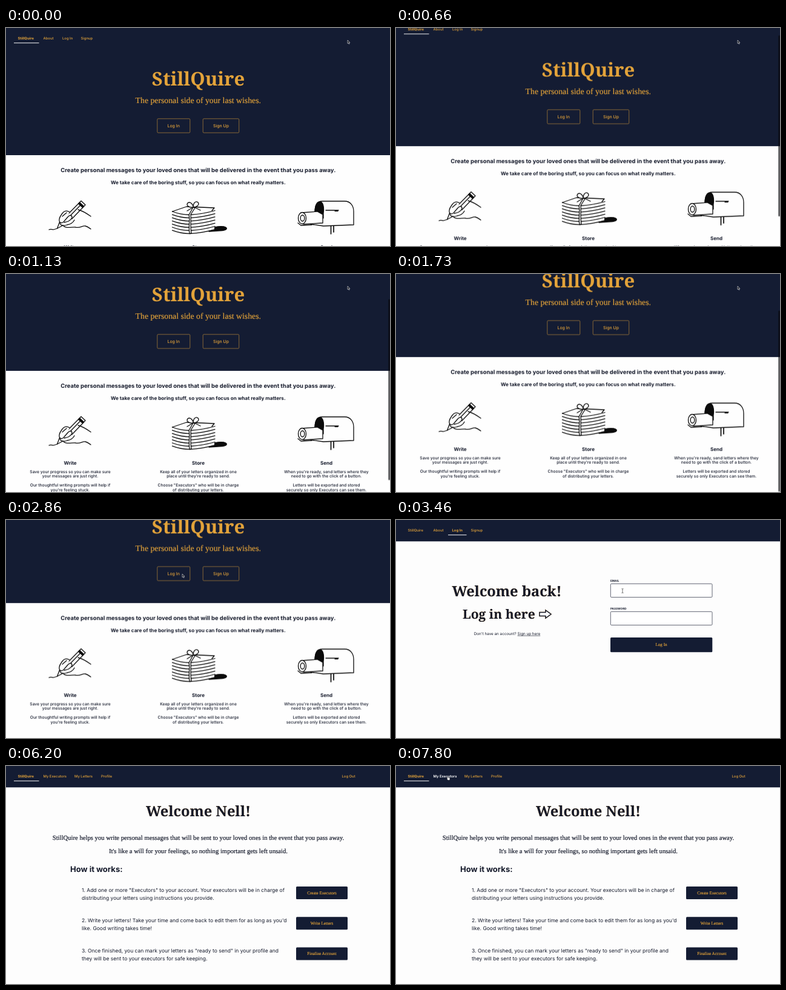
These frames come from a looping animation (634 px wide and 360 px high, 8 s). An HTML page:

```html
<!DOCTYPE html>
<html lang="en">
<head>
<meta charset="utf-8">
<title>StillQuire</title>
<style>
:root { --navy: #141c33; --gold: #e3a33a; --ink: #151a2b; }
html, body { margin: 0; width: 100%; height: 100%; overflow: hidden; background: #fefefe; }
svg { display: block; width: 100vw; height: 100vh; }
text { font-family: Inter, sans-serif; fill: var(--ink); text-rendering: geometricPrecision; white-space: pre; }
.mid { text-anchor: middle; }
.navy { fill: var(--navy); }
.nav text { font-size: 5.9px; font-weight: 500; fill: var(--gold); }
.nav .on { font-weight: 700; }
.nav path { stroke: #f4f4f6; stroke-width: 1; }
.serif, .cta text { font-family: "Liberation Serif", serif; }
.slab { font-family: "Noto Serif", serif; font-weight: 700; }
.gold { fill: var(--gold); }
.tagline { font-size: 13.75px; stroke: var(--gold); stroke-width: .15px; }
.glow { filter: drop-shadow(.9px .4px 0 var(--gold)); }
.ghost rect { fill: none; stroke: var(--gold); stroke-width: .8; stroke-opacity: .7; }
.ghost text { font-size: 7px; font-weight: 500; fill: var(--gold); }
.copy text { font-size: 6.7px; font-weight: 500; }
.copy .head { font-size: 8px; font-weight: 700; }
.cta text { font-size: 7.1px; fill: var(--gold); stroke: var(--gold); stroke-width: .15px; }
.lead { font-size: 10.65px; stroke: var(--ink); stroke-width: .2px; }
.list text { font-size: 8.5px; }
.label { font-size: 4.6px; font-weight: 700; }
.field { fill: #fff; stroke: #3b4152; stroke-width: .8; }
.art { fill: none; stroke: #0b0b0b; stroke-width: 1.3; stroke-linecap: round; stroke-linejoin: round; }
.art .white { fill: #fefefe; }
.art .black { fill: #0b0b0b; }

.home, .login, .welcome, .fill, .icons, .caret, .arrow, .beam, .hand, .type, .hover {
  animation: 8s step-end infinite;
}
.home { animation-name: home; }
.login { animation-name: login; }
.welcome { animation-name: welcome; }
.fill { animation-name: fill; }
.icons { animation-name: icons; }
.caret { animation-name: caret; }
.type { animation-name: type; }
.arrow { animation-name: arrow; }
.beam { animation-name: beam; }
.hand { animation-name: hand; }
.nav .hover { animation-name: hover; }
.page { animation: scroll 8s linear infinite; }
.thumb { animation: thumb 8s linear infinite, thumb-fade 8s linear infinite; }
.pointer { animation: pointer 8s ease-in-out infinite; }

@keyframes home { 0% { opacity: 1 } 36.625%, 100% { opacity: 0 } }
@keyframes login { 0% { opacity: 0 } 36.625% { opacity: 1 } 75.75%, 100% { opacity: 0 } }
@keyframes welcome { 0% { opacity: 0 } 75.75%, 100% { opacity: 1 } }
@keyframes icons { 0% { opacity: 0 } 48.25%, 100% { opacity: 1 } }
@keyframes fill { 0% { opacity: 0 } 50.75%, 100% { opacity: 1 } }
@keyframes caret { 0% { opacity: 0 } 59.5% { opacity: 1 } 65.75% { opacity: 0 } 68.25%, 100% { opacity: 1 } }
@keyframes type {
  0% { transform: none }
  68.25% { transform: translateX(4px) }
  70.75% { transform: translateX(7.5px) }
  73.25% { transform: translateX(14.5px) }
  74.5%, 100% { transform: translateX(21.5px) }
}
@keyframes scroll {
  0%, 5.75% { transform: none }
  10.75% { transform: translateY(-29.5px) }
  14.125% { transform: translateY(-50px) }
  16% { transform: translateY(-60px) }
  18.5% { transform: translateY(-69px) }
  21.5%, 100% { transform: translateY(-72.8px) }
}
@keyframes thumb {
  0%, 5.75% { transform: none }
  10.75% { transform: translateY(24.5px) }
  14.125% { transform: translateY(41.5px) }
  16% { transform: translateY(49.8px) }
  18.5% { transform: translateY(57.3px) }
  21.5%, 100% { transform: translateY(60.5px) }
}
@keyframes thumb-fade { 0%, 5.75% { opacity: 0 } 6.5%, 27.5% { opacity: .65 } 31%, 100% { opacity: 0 } }
@keyframes pointer {
  0%, 27.5% { transform: translate(564px, 20px) }
  35.75%, 38.25% { transform: translate(291px, 89px) }
  43.25%, 52.5% { transform: translate(374px, 117px) }
  58.25%, 82% { transform: translate(384.5px, 163.5px); animation-timing-function: step-end }
  82.5% { transform: translate(482px, 242px) }
  88.25%, 90% { transform: translate(127px, 72px) }
  97%, 100% { transform: translate(85px, 17px) }
}
@keyframes arrow { 0% { opacity: 1 } 41.5% { opacity: 0 } 82.5% { opacity: 1 } 94.5%, 100% { opacity: 0 } }
@keyframes beam { 0% { opacity: 0 } 41.5% { opacity: 1 } 68.25%, 100% { opacity: 0 } }
@keyframes hand { 0% { opacity: 0 } 94.5%, 100% { opacity: 1 } }
@keyframes hover { 0% { fill: var(--gold) } 94.5%, 100% { fill: #fff; font-weight: 600 } }
</style>
</head>
<body>
<svg viewBox="0 0 634 360">
  <defs>
    <path id="sheet" d="M274.500 303Q289 308.500 304 308.500Q326 307 345 301.500"/>
    <g id="icon"><rect width="5.600" height="5.600" rx=".8"/><path d="M1 2.800H4.600" stroke="#fff" stroke-width=".7" stroke-dasharray=".8 .6"/></g>
    <rect id="cta" class="navy" x="479" width="85" height="21" rx="1.500"/>
  </defs>

  <g class="home">
    <g class="page">
      <rect width="634" height="440" fill="#fefefe"/>
      <rect class="navy" width="634" height="210"/>
      <g class="nav">
        <text class="on" x="19.500" y="18.800">StillQuire</text>
        <text x="61.500" y="18.800">About</text>
        <text x="93" y="18.800">Log In</text>
        <text x="123.500" y="18.800">Signup</text>
        <path d="M13 24.700H54.500"/>
      </g>
      <text class="slab gold mid" x="317.500" y="94.500" font-size="31">StillQuire</text>
      <text class="serif gold tagline mid" x="317.300" y="124">The personal side of your last wishes.</text>
      <g class="ghost mid">
        <rect x="249.800" y="149.800" width="54" height="23.200" rx="1.500"/>
        <text x="276.700" y="163.900">Log In</text>
        <rect x="325.200" y="149.800" width="59.500" height="23.200" rx="1.500"/>
        <text x="355" y="163.900">Sign Up</text>
      </g>
      <text class="mid" x="317.300" y="238.400" font-size="9.400" font-weight="700">Create personal messages to your loved ones that will be delivered in the event that you pass away.</text>
      <text class="mid" x="317.300" y="258.300" font-size="8.130" font-weight="700">We take care of the boring stuff, so you can focus on what really matters.</text>

      <g class="art">
        <path d="M71 333C75 331 77 334 80 332.500L84.500 331"/>
        <path d="M89 319L84.500 331L94 326"/>
        <path class="white" d="M97 313L124 285.500L131 292L109 315Z"/>
        <path class="black" d="M119.500 290L121.500 288L128.500 294.500L126.500 296.500Z"/>
        <path d="M107 309L123 292.500"/>
        <path class="white" d="M105 304C99 300 94 303 91 309C88 313 87 318 88.500 320C90 323 94 322 96 319L103 311C107 308 110 310 108.500 314C106 319 101 320 96 321"/>
        <path d="M89 321C89 327 96 327 101 325C107 324 111 321 113 317M93 311L100 305"/>
        <path d="M119 300C127 302 133 306 140 311"/>
        <path d="M95 327C101 332 109 328 115 329C122 331 126 326 131 327C135 328 137 330 140 332"/>
      </g>

      <g class="art">
        <path class="black" d="M335 336C338 329 350 327 360 328C367 330 365 334 357 334.500Z"/>
        <path class="white" stroke="none" d="M275 303L298 295L344 297V333L304 340L275 334Z"/>
        <path class="white" d="M274.500 303L298 295L344 297L340 301.500"/>
        <use href="#sheet"/>
        <use href="#sheet" y="5.200"/>
        <use href="#sheet" y="10.400"/>
        <use href="#sheet" y="15.600"/>
        <use href="#sheet" y="20.800"/>
        <use href="#sheet" y="26"/>
        <use href="#sheet" y="31.200"/>
        <path class="white" d="M302 308.500C304 316 301 327 303 339.500L306 339C304 326 306 316 305 308L312 297L309 296Z"/>
        <path class="white" d="M309 296C302 297 297 293 300 289C304 286 309 291 309 296C309 289 313 285 317 288C320 292 315 296 309 296Z"/>
        <path d="M309 296L299 302M311 296L321 301"/>
      </g>

      <g class="art">
        <path d="M536.500 327V340M541 327V337" stroke-width="1.700"/>
        <path class="white" d="M510 305C510 291 514 286 522 286H559C569 286 574 294 574 303V325L524 327L503 324"/>
        <path class="black" d="M510 312V304C510 290 515 286 520 287C525 290 525 300 524 306V314Z"/>
        <path class="white" d="M488 305L514 303L523 308V322L491 324Z"/>
        <ellipse class="white" cx="489" cy="314" rx="6.500" ry="9.500"/>
        <ellipse class="white" cx="489.500" cy="314" rx="3.300" ry="5"/>
        <path d="M482 322L487 326L505 325"/>
        <path d="M528 301H549M543 302.300H548"/>
      </g>

      <g class="copy mid">
        <text class="head" x="106" y="365.200">Write</text>
        <text x="106" y="378.500">Save your progress so you can make sure</text>
        <text x="106" y="386.400">your messages are just right.</text>
        <text x="106" y="400.700">Our thoughtful writing prompts will help if</text>
        <text x="106" y="408.500">you're feeling stuck.</text>
        <text class="head" x="317.500" y="365.200">Store</text>
        <text x="317.500" y="378.500">Keep all of your letters organized in one</text>
        <text x="317.500" y="386.400">place until they're ready to send.</text>
        <text x="317.500" y="400.700">Choose "Executors" who will be in charge</text>
        <text x="317.500" y="408.500">of distributing your letters.</text>
        <text class="head" x="529" y="365.200">Send</text>
        <text x="529" y="378.500">When you're ready, send letters where they</text>
        <text x="529" y="386.400">need to go with the click of a button.</text>
        <text x="529" y="400.700">Letters will be exported and stored</text>
        <text x="529" y="408.500">securely so only Executors can see them.</text>
      </g>
    </g>
    <rect class="thumb" x="631.200" y="0" width="2.800" height="299" rx="1.400" fill="#08090c"/>
  </g>

  <g class="login">
    <rect width="634" height="360" fill="#fdfdfd"/>
    <rect class="navy" width="634" height="35.300"/>
    <g class="nav">
      <text x="19.500" y="18.800">StillQuire</text>
      <text x="61.500" y="18.800">About</text>
      <text class="on" x="92.500" y="18.800">Log In</text>
      <text x="123.500" y="18.800">Signup</text>
      <path d="M86 24.700H116.500"/>
    </g>
    <g class="glow">
      <text class="slab mid" x="183" y="125.500" font-size="23.600">Welcome back!</text>
      <text class="slab" x="110" y="163" font-size="21">Log in here</text>
      <path d="M237 152.500H247V149L256 155.500L247 162V158.500H237Z" fill="#fdfdfd" stroke="#151a2b" stroke-width="1.500"/>
    </g>
    <text class="mid" x="183.500" y="189.800" font-size="6.300">Don't have an account? <tspan text-decoration="underline">Sign up here</tspan></text>

    <text class="label" x="354" y="101.800">EMAIL</text>
    <rect class="field" x="354.300" y="105.300" width="167.700" height="22.300" rx="1.500"/>
    <text class="serif fill" x="361.700" y="118.600" font-size="7">nelldraws@example.com</text>
    <text class="label" x="354" y="147.900">PASSWORD</text>
    <rect class="field" x="354.300" y="151.300" width="167.700" height="22.300" rx="1.500"/>
    <path d="M364 162.700h21.500" stroke="#151a2b" stroke-width="2.200" stroke-linecap="round" stroke-dasharray="0 3.500"/>
    <g class="type">
      <rect x="361" y="157" width="30" height="11" fill="#fff"/>
      <path class="caret" d="M362 158V166.700" stroke="#444956" stroke-width=".7"/>
    </g>
    <g class="icons">
      <use href="#icon" x="516" y="113.500" fill="#555"/>
      <use href="#icon" x="516" y="159.700" fill="#0b0b0b"/>
    </g>
    <g class="cta mid">
      <rect class="navy" x="354" y="194" width="168.300" height="24.300" rx="1.500"/>
      <text x="438" y="208.400">Log In</text>
    </g>
  </g>

  <g class="welcome">
    <rect width="634" height="360" fill="#fdfdfd"/>
    <rect class="navy" width="634" height="35.300"/>
    <g class="nav">
      <text class="on" x="19.500" y="18.800">StillQuire</text>
      <text class="hover" x="61.500" y="18.800">My Executors</text>
      <text x="113" y="18.800">My Letters</text>
      <text x="157" y="18.800">Profile</text>
      <text x="554.500" y="18.800">Log Out</text>
      <path d="M13 24.700H54.500"/>
    </g>
    <text class="slab mid glow" x="317.500" y="83" font-size="23.600">Welcome Nell!</text>
    <text class="serif lead mid" x="317.500" y="122">StillQuire helps you write personal messages that will be sent to your loved ones in the event that you pass away.</text>
    <text class="serif lead mid" x="317.500" y="144">It's like a will for your feelings, so nothing important gets left unsaid.</text>
    <text x="106" y="175.300" font-size="13" font-weight="700">How it works:</text>
    <g class="list">
      <text x="125" y="208">1. Add one or more "Executors" to your account. Your executors will be in charge of</text>
      <text x="125" y="220.500">distributing your letters using instructions you provide.</text>
      <text x="125" y="258.200">2. Write your letters! Take your time and come back to edit them for as long as you'd</text>
      <text x="125" y="270.700">like. Good writing takes time!</text>
      <text x="125" y="308.400">3. Once finished, you can mark your letters as "ready to send" in your profile and</text>
      <text x="125" y="320.900">they will be sent to your executors for safe keeping.</text>
    </g>
    <g class="cta mid">
      <use href="#cta" y="199"/>
      <text x="521.500" y="211.800">Create Executors</text>
      <use href="#cta" y="249.200"/>
      <text x="521.500" y="262">Write Letters</text>
      <use href="#cta" y="299.400"/>
      <text x="521.500" y="312.200">Finalize Account</text>
    </g>
  </g>

  <g class="pointer">
    <path class="arrow" d="M0 0V5.600L1.300 4.500L2.200 6.500L3.200 6L2.300 4.100H4Z" fill="#15171d" stroke="#e8e9ee" stroke-width=".6"/>
    <path class="beam" d="M-1.500 -3.500Q0 -3.500 0 -2.700Q0 -3.500 1.500 -3.500M0 -2.700V2.700M-1.500 3.500Q0 3.500 0 2.700Q0 3.500 1.500 3.500" fill="none" stroke="#333" stroke-width=".7"/>
    <path class="hand" d="M0 .5Q.7 -.4 1.300 .5V2.300L3.600 2.800Q4.200 3 4 4L3.500 6.300H.6L-1.200 3.800Q-1 2.900 0 3.600Z" fill="#fff" stroke="#222" stroke-width=".4"/>
  </g>
</svg>
</body>
</html>
```
